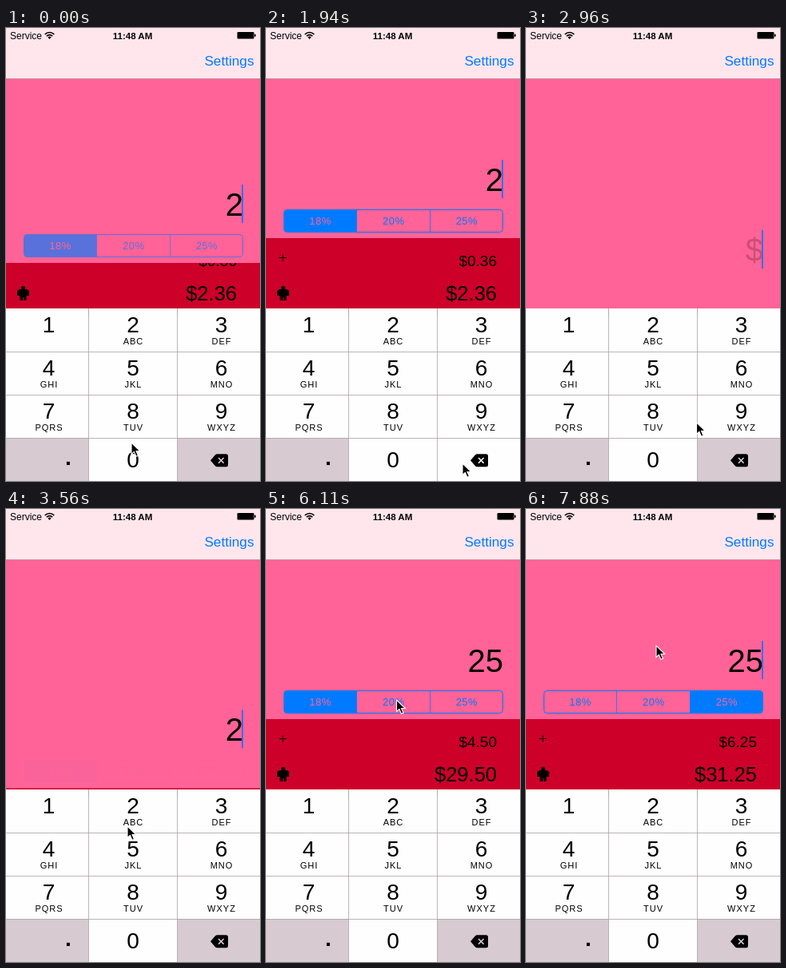
Write an HTML page that moves like this. It is 318 px wide and 567 px high and loops after 8 s.

```html
<!DOCTYPE html>
<html lang="en">
<head>
<meta charset="utf-8">
<title>Tip calculator</title>
<style>
  html, body { margin: 0; width: 100%; height: 100%; overflow: hidden; }
  svg { display: block; width: 100vw; height: 100vh; }
  text { font-family: "Liberation Sans", Arial, sans-serif; }
  .mid { text-anchor: middle; }
  .end { text-anchor: end; }
  .sub { font-size: 11px; letter-spacing: 1px; }
  .seg { font-size: 13px; letter-spacing: .5px; }
</style>
</head>
<body>
<svg id="stage" viewBox="0 0 318 567"></svg>
<script>
const LOOP = 8000, STEP = 148.6, LAST = 53;
const PINK = '#ff6397', BLUE = '#007aff', GREY = '#d8cad1';
const TRAVEL = 88, SLIDE = 400;
const stage = document.getElementById('stage');

function el(parent, tag, attrs, text) {
  const node = document.createElementNS('http://www.w3.org/2000/svg', tag);
  for (const k in attrs) node.setAttribute(k, attrs[k]);
  if (text !== undefined) node.textContent = text;
  return parent.appendChild(node);
}
const rect = (p, x, y, width, height, fill, more) =>
  el(p, 'rect', { x, y, width, height, fill, ...more });
const label = (p, x, y, size, cls, text, more) =>
  el(p, 'text', { x, y, 'font-size': size, class: cls, ...more }, text);
const path = (p, d, more) => el(p, 'path', { d, ...more });

// Result area, uncovered by the sliding panel
rect(stage, 0, 200, 318, 160, '#cc0029');
path(stage, 'M16.5 287.5h9M21 283v9', { stroke: '#000', 'stroke-width': 1 });
const tip = label(stage, 289, 297.5, 19, 'end');
const total = label(stage, 289, 341, 25.5, 'end');
el(stage, 'circle', { cx: 21.5, cy: 325.3, r: 2.5 });
path(stage, 'M17 327h9l3 2v6h-3v-2l-.6 8h-3.4v-4h-1v4h-3.4l-.6-8v2h-3v-6z');

// Sliding panel
const panel = el(stage, 'g', {});
rect(panel, 0, -50, 318, 313, PINK);
const bill = label(panel, 297, 204, 40, 'end');
const caret = rect(panel, 295, 165, 2, 48, '#3a6cf0');
const picker = el(panel, 'g', {});
const fills = [
  'M113.5 227.5H26.5a4 4 0 0 0-4 4v20a4 4 0 0 0 4 4h87z',
  'M113.5 227.5h92v28h-92z',
  'M205.5 227.5h87a4 4 0 0 1 4 4v20a4 4 0 0 1-4 4h-87z'
].map(d => path(picker, d, { fill: BLUE }));
rect(picker, 22.5, 227.5, 274, 28, 'none', { rx: 4, stroke: BLUE });
path(picker, 'M113.5 227.5v28M205.5 227.5v28', { stroke: BLUE, opacity: .75 });
const rates = [18, 20, 25];
const rateLabels = rates.map((r, i) =>
  label(picker, 68 + i * 91.7, 246, 13, 'mid seg', r + '%'));

// Navigation and status bars
rect(stage, 0, 0, 318, 63, '#ffe6ed');
rect(stage, 0, 63, 318, 1, '#c98fa3');
label(stage, 5, 14, 12, '', 'Service');
label(stage, 158.5, 14, 11.5, 'mid', '11:48 AM', { 'font-weight': 700 });
label(stage, 310.5, 47, 17.2, 'end', 'Settings', { fill: BLUE });
path(stage, 'M48.7 8a8 8 0 0 1 11.6 0M50.8 10.2a5 5 0 0 1 7.4 0',
  { fill: 'none', stroke: '#000', 'stroke-width': 1.7 });
path(stage, 'M52.4 11.6a3 3 0 0 1 4.2 0l-2.1 2.3z');
rect(stage, 289.5, 5, 21, 8.5, '#000', { rx: 1 });
rect(stage, 311, 7.5, 1.6, 3.5, '#000', { rx: .8 });

// Keypad
const cols = [0, 103.5, 214.5, 318], mids = [53.5, 159, 269.5];
const letters = ['', 'ABC', 'DEF', 'GHI', 'JKL', 'MNO', 'PQRS', 'TUV', 'WXYZ'];
const keys = [];
for (let i = 0; i < 12; i++) {
  const c = i % 3, y = 351 + Math.floor(i / 3) * 54;
  keys.push(rect(stage, cols[c], y, cols[c + 1] - cols[c], 55, '#fefefe'));
  if (i > 8) continue;
  label(stage, mids[c], y + 30, 28, 'mid', i + 1);
  label(stage, mids[c] + .5, y + 45, 11, 'mid sub', letters[i]);
}
label(stage, 78, 547, 28, 'mid', '.', { 'font-weight': 700 });
label(stage, 159, 550, 28, 'mid', '0');
path(stage, 'M0 405.5h318M0 459.5h318M0 513.5h318M103.5 351v216M214.5 351v216',
  { stroke: '#aaa4a7', 'stroke-width': .8 });
path(stage, 'M256 541.3l6-7q1-1 2.4-1H275.500q2.500 0 2.500 2.500v11q0 2.500-2.500 2.500H264.400q-1.400 0-2.400-1z');
const cross = path(stage, 'M266 538l6.600 6.600M272.600 538l-6.600 6.600',
  { 'stroke-width': 1.5 });

const pointer = path(stage, 'M0 0v14.500l3.400-3.100 2.500 5.900 2.600-1.100-2.500-5.700h4.800z',
  { stroke: '#fff', 'stroke-width': 1.1 });

// Pointer stops: step, x, y
const route = [
  [0, 157, 519], [6, 157, 548], [7, 157, 548], [12, 246, 545], [17, 246, 545],
  [22, 152, 397], [24, 152, 397], [28, 156, 430], [36, 156, 430],
  [41, 163.5, 239], [45, 163.5, 239], [49, 245, 240], [50, 245, 240], [53, 163, 171]
];
// Steps during which the caret is hidden
const blinks = [[3, 6], [10, 13], [20, 23], [34, 37], [41, 44], [48, 51]];

const within = (n, a, b) => n >= a && n < b;
const ease = p => .5 - .5 * Math.cos(Math.PI * Math.min(1, Math.max(0, p)));
const slide = (t, start) => ease((t - start) / SLIDE);
const money = v => '$' + v.toFixed(2);

function pointerAt(n) {
  let i = 1;
  while (i < route.length - 1 && route[i][0] < n) i++;
  const [n0, x0, y0] = route[i - 1], [n1, x1, y1] = route[i];
  const p = ease((n - n0) / (n1 - n0));
  return [x0 + (x1 - x0) * p, y0 + (y1 - y0) * p];
}

function draw(time) {
  const n = Math.min(LAST, Math.floor((time + 8) / STEP)), t = n * STEP;

  const hidden = 1 - slide(t, -238) + slide(t, 2356) - slide(t, 3533);
  panel.setAttribute('transform', `translate(0 ${(hidden * TRAVEL).toFixed(2)})`);
  picker.setAttribute('opacity', 1 - hidden);

  const value = within(n, 16, 24) ? 0 : n < 30 ? 2 : 25;
  const chosen = n < 43 ? 0 : n < 50 ? 1 : 2;
  const extra = value * rates[chosen] / 100;
  bill.textContent = value || '$';
  bill.setAttribute('opacity', value ? 1 : .2);
  tip.textContent = money(extra);
  total.textContent = money(value + extra);
  fills.forEach((f, i) => f.setAttribute('opacity', i === chosen ? 1 : 0));
  rateLabels.forEach((r, i) => r.setAttribute('fill', i === chosen ? PINK : BLUE));
  caret.setAttribute('opacity', blinks.some(([a, b]) => within(n, a, b)) ? 0 : 1);

  const erase = within(n, 13, 15);
  const shade = (i, on) => keys[i].setAttribute('fill', on ? GREY : '#fefefe');
  shade(1, within(n, 22, 24));
  shade(4, within(n, 28, 30));
  shade(9, true);
  shade(11, !erase);
  cross.setAttribute('stroke', erase ? '#fefefe' : GREY);

  pointer.setAttribute('transform', `translate(${pointerAt(n)})`);
}

const begin = performance.now();
function tick() {
  draw((performance.now() - begin) % LOOP);
  requestAnimationFrame(tick);
}
tick();
</script>
</body>
</html>
```
